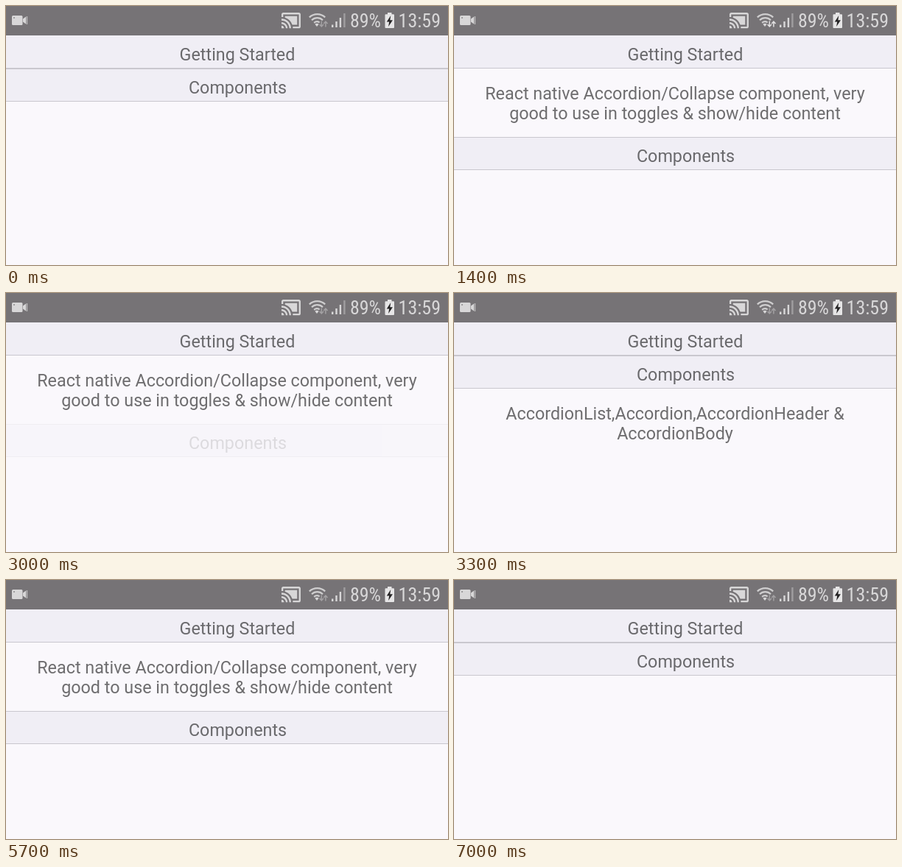
Animation, 600 px wide and 352 px high, one loop 8.1 s. Source, as an HTML page:

```html
<!DOCTYPE html>
<html lang="en">
<head>
<meta charset="utf-8">
<title>Accordion</title>
<style>
  html, body { margin: 0; width: 100%; height: 100%; overflow: hidden; background: #faf8fc; }
  svg { display: block; }
  text { font: 23.333px Roboto, sans-serif; fill: rgba(0, 0, 0, .56); text-anchor: middle; }
  .status text { font: 26px "Roboto Condensed", Roboto, sans-serif; font-stretch: 75%; fill: #d8d7d8; text-anchor: end; }
  .fill { fill: #f0eef5; }
  .line { fill: #c9c7ce; }

  .tap-first, .tap-second, .slide, .intro, .parts, .traffic {
    animation: 8100ms step-end infinite;
  }
  .tap-first { animation-name: tap-first; }
  .tap-second { animation-name: tap-second; }
  .slide { animation-name: slide; }
  .intro { animation-name: intro; }
  .parts { animation-name: parts; }
  .traffic { animation-name: traffic; }

  /* Pressed headers drop to 20% and ease back after release. */
  @keyframes tap-first {
    0%, 12.34%, 70.37%, 86.41% { opacity: 1; }
    7.4%, 66.66%, 81.48% { opacity: .2; }
    9.87%, 67.9%, 83.95% { opacity: .3; }
    11.11%, 69.13%, 85.18% { opacity: .76; }
  }
  @keyframes tap-second {
    0%, 40.74% { opacity: 1; }
    37.03% { opacity: .2; }
    38.27% { opacity: .3; }
    39.5% { opacity: .76; }
  }
  @keyframes slide {
    0%, 38.27%, 83.95% { transform: translateY(0); }
    9.87%, 67.9% { transform: translateY(93px); }
  }
  @keyframes intro {
    0%, 38.27%, 83.95% { visibility: hidden; }
    9.87%, 67.9% { visibility: visible; }
  }
  @keyframes parts {
    0%, 67.9% { visibility: hidden; }
    38.27% { visibility: visible; }
  }
  @keyframes traffic {
    0%, 29.62% { stroke: #a3a1a3; }
    17.28% { stroke: #e2e1e2; }
  }
</style>
</head>
<body>
<svg width="600" height="352" viewBox="0 0 600 352">
  <rect width="600" height="352" fill="#faf8fc"/>

  <g class="tap-first">
    <rect class="fill" y="40" width="600" height="45"/>
    <rect class="line" y="84" width="600" height="1"/>
    <text x="314" y="74">Getting Started</text>
  </g>

  <g class="intro">
    <text x="300" y="127">React native Accordion/Collapse component, very</text>
    <text x="300" y="154.3">good to use in toggles &amp; show/hide content</text>
  </g>

  <g class="slide">
    <g class="tap-second">
      <rect class="fill" y="85" width="600" height="45"/>
      <rect class="line" y="85" width="600" height="1"/>
      <rect class="line" y="129" width="600" height="1"/>
      <text x="314.5" y="119">Components</text>
    </g>
  </g>

  <g class="parts">
    <text x="300" y="172">AccordionList,Accordion,AccordionHeader &amp;</text>
    <text x="300" y="199.3">AccordionBody</text>
  </g>

  <g class="status" fill="#d8d7d8">
    <rect width="600" height="40" fill="#767376"/>

    <!-- camera -->
    <rect x="8" y="13" width="14.5" height="13" rx="1.5"/>
    <path d="M23 17.5l4-3v10l-4-3z"/>
    <path d="M27.6 14h1.6v11h-1.6z" opacity=".7"/>
    <circle cx="11" cy="16" r="1" fill="#8d8b8d"/>

    <!-- cast -->
    <path transform="translate(372.8 5.5) scale(1.18)" d="M1 18v3h3c0-1.66-1.34-3-3-3zm0-4v2c2.76 0 5 2.24 5 5h2c0-3.87-3.13-7-7-7zm18-7H5v1.63c3.96 1.28 7.09 4.41 8.37 8.37H19V7zM1 10v2c4.97 0 9 4.03 9 9h2c0-6.08-4.93-11-11-11zm20-7H3c-1.1 0-2 .9-2 2v3h2V5h18v14h-7v2h7c1.1 0 2-.9 2-2V5c0-1.1-.9-2-2-2z"/>

    <!-- wifi -->
    <g fill="none" stroke="#cfcecf" stroke-width="2.2">
      <path d="M411.8 15.4a15.5 15.5 0 0 1 21.4 0"/>
      <path d="M415 19.2a10.5 10.5 0 0 1 15 0"/>
      <path d="M418.2 22.8a6 6 0 0 1 7.4-.4"/>
    </g>
    <path d="M422 28l-2.6-3.2a4 4 0 0 1 5.2 0z"/>
    <g class="traffic" fill="none" stroke="#a3a1a3" stroke-width="1.5">
      <path d="M428.3 20.5v7M425.6 25l2.7 2.8 2.7-2.8"/>
      <path d="M433.9 28.5v-7M431.2 24l2.7-2.8 2.7 2.8"/>
    </g>

    <!-- signal -->
    <path d="M442 25.5h2.4v3.5h-2.4zM447.3 21h2.4v8h-2.4zM452.7 16h2.4v13h-2.4z"/>
    <path d="M458.2 10h2.4v19h-2.4z" fill="#a09ea0"/>

    <text x="509" y="29">89%</text>

    <!-- battery -->
    <path d="M518 9h5.5v2.2h2.5a1 1 0 0 1 1 1V29a1 1 0 0 1-1 1h-10.500a1 1 0 0 1-1-1V12.200a1 1 0 0 1 1-1h2.500z" fill="#e6e5e6"/>
    <path d="M522.300 13l-5.500 8.600h3.400l-1.100 6.400 5.800-8.800h-3.600z" fill="#242324"/>

    <text x="590" y="29">13:59</text>
  </g>
</svg>
</body>
</html>
```
